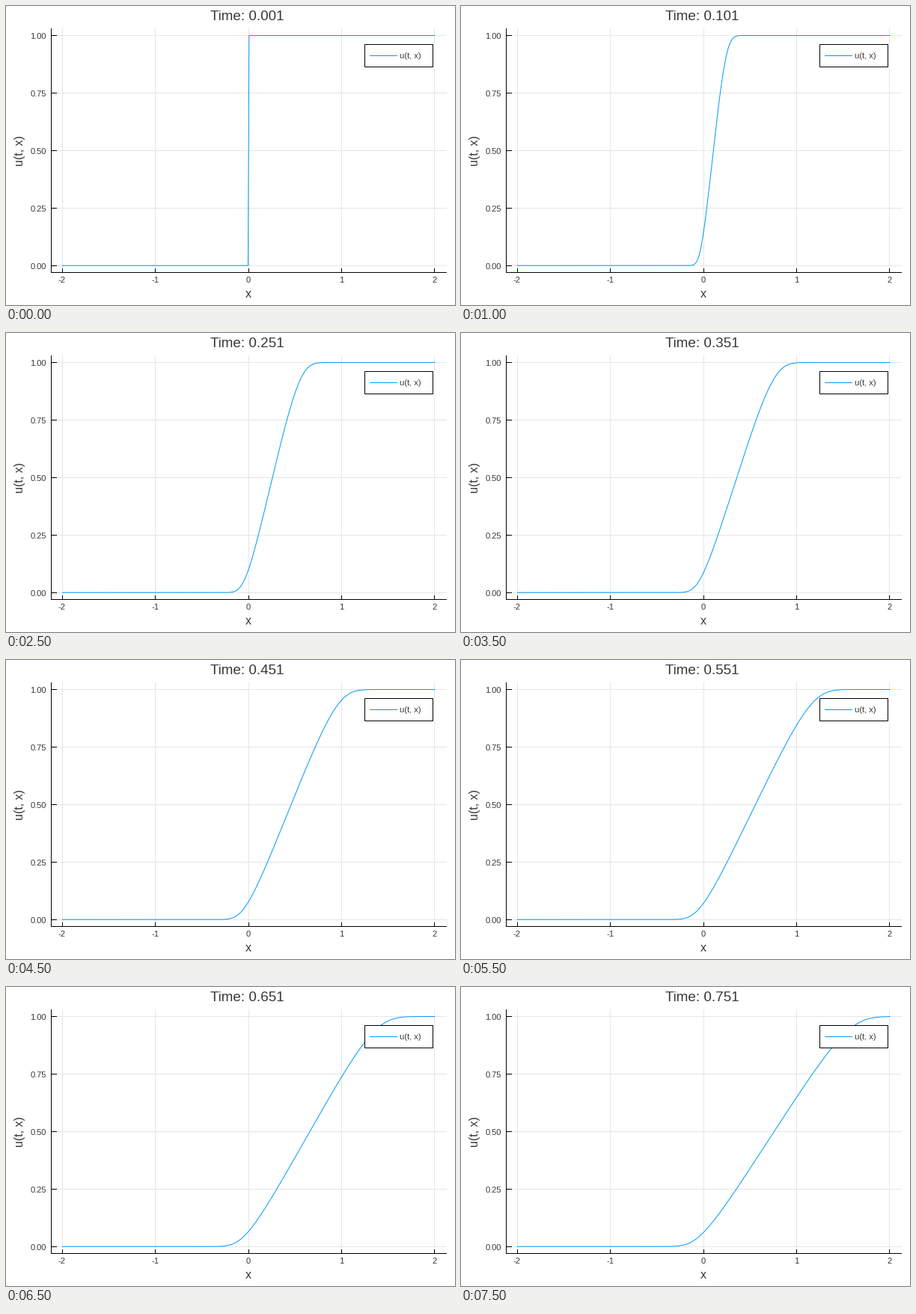
A matplotlib script that plays this animation: 600 px wide and 400 px high, repeating every 8000 ms.

```python
import numpy as np
import matplotlib.pyplot as plt
from matplotlib.animation import FuncAnimation
from matplotlib.patches import Rectangle

plt.rcParams["font.family"] = "Liberation Sans"

W, H, DPI = 600, 400, 100
FRAMES, INTERVAL = 16, 500
STEPS = 50                      # solver steps between frames
DT, NU = 0.001, 0.01
BLUE, INK, GRID = "#009afa", "#383838", "#e5e5e5"
LEFT, RIGHT, TOP, BOTTOM = 60, 588, 30, 356
THIN = 72 / DPI                 # one pixel in points


def px(x):
    return 324.15 + 124.35 * x


def py(u):
    return 347.2 - 307.7 * u


def step(u, dx):
    """Upwind convection 2*u*u_x plus explicit diffusion, fixed ends."""
    new = u.copy()
    mid, prev, nxt = u[1:-1], u[:-2], u[2:]
    new[1:-1] += DT * (NU * (nxt - 2 * mid + prev) / dx**2
                       - 2 * mid * (mid - prev) / dx)
    return new


def solve(x):
    dx = x[1] - x[0]
    u = (x > 0).astype(float)
    states = [u]
    for _ in range(FRAMES - 1):
        for _ in range(STEPS):
            u = step(u, dx)
        states.append(u)
    return states


x = np.linspace(-2, 2, 400)
states = solve(x)

fig = plt.figure(figsize=(W / DPI, H / DPI), dpi=DPI, facecolor="white")
ax = fig.add_axes([0, 0, 1, 1])
ax.set_xlim(0, W)
ax.set_ylim(H, 0)
ax.axis("off")


def line(xs, ys, color="black", z=2):
    return ax.plot(xs, ys, color=color, lw=THIN, zorder=z)[0]


def label(x, y, s, size=8, ha="center", **kw):
    return ax.text(x, y, s, fontsize=size, color=INK, ha=ha,
                   va=kw.pop("va", "baseline"), zorder=6, **kw)


for v in range(-2, 3):
    col = np.floor(px(v))
    line([col, col], [TOP, BOTTOM], GRID, 1)
    line([col, col], [BOTTOM, BOTTOM - 5])
    label(px(v) - 0.7, 370, str(v))
for v in np.linspace(0, 1, 5):
    row = np.floor(py(v))
    line([LEFT, RIGHT], [row, row], GRID, 1)
    line([LEFT, LEFT + 7], [row, row])
    label(53.7, py(v) + 4.4, f"{v:.2f}", ha="right")
line([LEFT, LEFT], [TOP, BOTTOM])
line([LEFT, RIGHT], [BOTTOM, BOTTOM])

label(324, 390, "x", 11.5)
label(25.5, 193.7, "u(t, x)", 11.5, rotation=90, va="center", ha="right")
title = label(322.2, 19, "", 13.6)
curve = line(px(x), py(states[0]), BLUE, 3)

ax.add_patch(Rectangle((479, 51), 91, 30, fc="white", ec="black",
                       lw=THIN, zorder=4))
line([485.5, 521.5], [66, 66], BLUE, 5)
label(526.3, 70.5, "u(t, x)", ha="left")


def update(i):
    title.set_text(f"Time: {(i * STEPS + 1) * DT:.3f}")
    curve.set_ydata(py(states[i]))
    return title, curve


anim = FuncAnimation(fig, update, frames=FRAMES, interval=INTERVAL,
                     init_func=lambda: update(0), repeat=True, repeat_delay=0)
plt.show()
```
